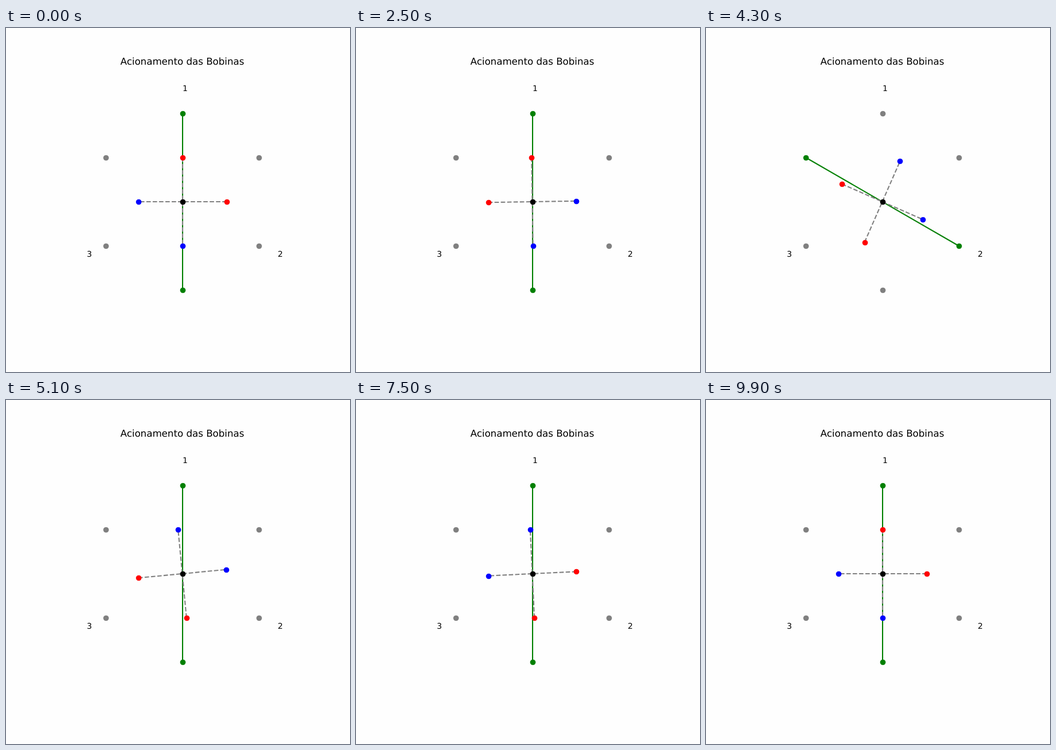
An HTML page that plays this animation: 600x600 px, repeating every 10 s.

```html
<!DOCTYPE html>
<html lang="pt">
<head>
<meta charset="utf-8">
<title>Acionamento das Bobinas</title>
<style>
  html, body { margin: 0; width: 100%; height: 100%; overflow: hidden; background: #fefefe; }
  svg { display: block; width: 600px; height: 600px; }
  line { stroke-width: 2.083; }
  text { font: 13.889px "DejaVu Sans", sans-serif; fill: #000; text-rendering: geometricPrecision; }
  .title { font-size: 16.667px; text-anchor: middle; }
  .bar { stroke: #808080; stroke-dasharray: 7.708 3.333; }
</style>
</head>
<body>
<svg id="stage" viewBox="0 0 600 600">
  <text class="title" x="307.5" y="64">Acionamento das Bobinas</text>
  <text x="308" y="110">1</text>
  <text x="474" y="399">2</text>
  <text x="141" y="399">3</text>
</svg>
<script>
const STEP = 100, STEPS = 100;
const CX = 307.5, CY = 303, UNIT = 77;
const COIL_ANGLES = [90, 30, 150]; // firing order: coils 1, 3, 2
const stage = document.getElementById('stage');

function add(tag, attrs) {
  const el = document.createElementNS('http://www.w3.org/2000/svg', tag);
  set(el, attrs);
  return stage.appendChild(el);
}

function set(el, attrs) {
  for (const key in attrs) el.setAttribute(key, attrs[key]);
}

function polar(radius, deg) {
  const a = deg * Math.PI / 180;
  return [CX + UNIT * radius * Math.cos(a), CY - UNIT * radius * Math.sin(a)];
}

const snap = v => Math.floor(v + 0.5 + 1e-6);

function dot(fill) {
  return add('circle', { r: 4.86, fill });
}

// Dots sit on whole pixels
function placeDot(el, [x, y]) {
  set(el, { cx: snap(x) + 0.5, cy: snap(y) + 0.5 });
}

// Only upright and level lines sit on whole pixels
function placeLine(el, from, to) {
  const straight = from.some((v, k) => Math.abs(v - to[k]) < 1e-4);
  const [x1, y1, x2, y2] = [...from, ...to].map(v => straight ? snap(v) : v);
  set(el, { x1, y1, x2, y2 });
}

const coils = COIL_ANGLES.map(deg => {
  const ends = [polar(2, deg), polar(2, deg + 180)];
  const line = add('line', { stroke: '#008000' });
  placeLine(line, ...ends);
  const dots = ends.map(p => {
    const d = dot('#808080');
    placeDot(d, p);
    return d;
  });
  return { line, dots };
});

const bars = [0, 90].map(offset => ({
  offset,
  line: add('line', { class: 'bar' }),
  red: dot('#ff0000'),
  blue: dot('#0000ff')
}));

placeDot(dot('#000000'), [CX, CY]);

function draw(step) {
  const active = Math.floor(step * 12 / (STEPS - 1)) % 3;
  coils.forEach(({ line, dots }, k) => {
    const on = k === active;
    set(line, { visibility: on ? 'visible' : 'hidden' });
    dots.forEach(d => set(d, { fill: on ? '#008000' : '#808080' }));
  });

  const angle = step * 360 / (STEPS - 1);
  for (const { offset, line, red, blue } of bars) {
    const from = polar(1, angle + offset);
    const to = polar(1, angle + offset + 180);
    placeLine(line, from, to);
    placeDot(red, from);
    placeDot(blue, to);
  }
}

const start = performance.now();
function tick() {
  const t = Math.max(0, performance.now() - start);
  draw(Math.floor(t / STEP) % STEPS);
  requestAnimationFrame(tick);
}
tick();
</script>
</body>
</html>
```
